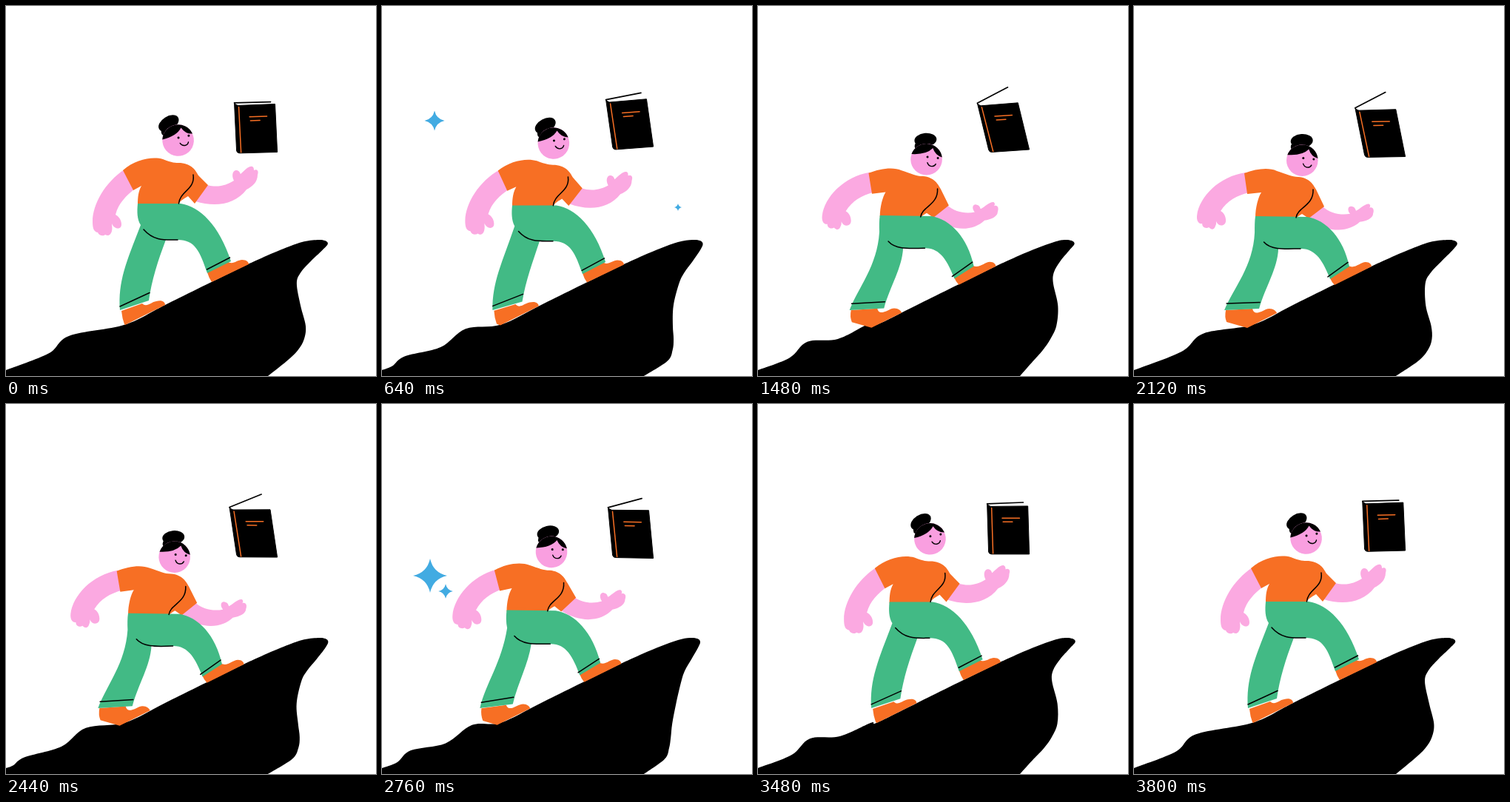
Animation of 500 by 500 pixels, one loop 3840 ms. Source, as an HTML page:

```html
<!DOCTYPE html>
<html lang="en">
<head>
<meta charset="utf-8">
<title>Uphill with a book</title>
<style>
html, body { margin: 0; width: 100%; height: 100%; overflow: hidden; background: #fff; }
svg { display: block; width: 100vw; height: 100vh; }
</style>
</head>
<body>
<svg id="stage" viewBox="0 0 500 500"></svg>
<script>
const LOOP = 3840, TURN = 1940, RIPPLE = 1920;
const PINK = '#fba9e1', FACE = '#f99fe0', ORANGE = '#f76f24', GREEN = '#42ba85', BLUE = '#42abe2';
const stage = document.getElementById('stage');

function add(tag, attrs, parent = stage) {
  const el = document.createElementNS('http://www.w3.org/2000/svg', tag);
  for (const k in attrs) el.setAttribute(k, attrs[k]);
  return parent.appendChild(el);
}
const fill = (color, d = '', parent) => add('path', { fill: color, d }, parent);
const line = (color, width, d = '', parent) =>
  add('path', { fill: 'none', stroke: color, 'stroke-width': width, 'stroke-linecap': 'round', d }, parent);
const lerp = (a, b, k) => a + (b - a) * k;
const wave = (t, peak, period = LOOP) => Math.cos((t - peak) / period * 2 * Math.PI);

// Smooth curve through the given points.
function smooth(p) {
  let d = `M${p[0]}`;
  for (let i = 0; i < p.length - 1; i++) {
    const a = p[Math.max(i - 1, 0)], b = p[i], c = p[i + 1], e = p[Math.min(i + 2, p.length - 1)];
    d += `C${b.map((v, j) => v + (c[j] - a[j]) / 6)} ${c.map((v, j) => v - (e[j] - b[j]) / 6)} ${c}`;
  }
  return d;
}

// Humps are born at the far left, drift up the bank and fade near the shoe.
const BORN = 380, GONE = 3500;
function bank(t) {
  const pts = [[0, 492]];
  for (let age = t % RIPPLE; age < GONE; age += RIPPLE) {
    if (age <= BORN) continue;
    const size = 13 * Math.sqrt(Math.sin(Math.PI * (age - BORN) / (GONE - BORN)));
    const notch = 16 + .034 * (age - 700), crest = 33 + .043 * (age - 700);
    pts.push([notch, 492 - .39 * notch], [crest, 492 - .39 * crest - size]);
  }
  return pts;
}

// The overhang: a sine wave running down its resting outline.
const overhang = [[426, 330], [414, 345], [403.5, 360], [399, 375], [399, 405], [399, 432], [396, 450], [390, 465], [379, 480]];
const ridge = [[161, 430.5], [215, 404], [300, 362], [340, 343], [375, 328], [400, 319]];
const sway = (t, y) => lerp(5.5, 7.5, (y - 321) / 160) * wave(t, 600 + 13.3 * (y - 345), RIPPLE);

const cliff = fill('#000');
function drawCliff(t) {
  const tip = 431.5 + sway(t, 321);
  const nose = [[tip - 14, 316], [tip - 4, 317], [tip, 321.5]];
  const side = overhang.map(([x, y]) => [x + sway(t, y), y]);
  cliff.setAttribute('d', smooth([...bank(t), ...ridge, ...nose, ...side, [354, 500]]) + 'L0,500Z');
}

// Body parts: each is a path in the upright pose and in the crouched pose.
const parts = [];
const part = (el, up, down) => parts.push({ el, up, down: down.match(/[\d.]+/g).map(Number) });

// back shoe
part(fill(ORANGE),
  'M156,412L184,402C190,408 196,400 203,399C211,397 215,400 215,404L161,431L160,430Q157,422 156,412Z',
  'M124,411L160,409C162,419 172,413 178,410C186,407 192,412 193,415L153,435L125,427Q122,420 124,411Z');
// front shoe
part(fill(ORANGE),
  'M272,360L299,345C306,351 312,343 319,343C325,343 328,346 328,349L278,373Q274,367 272,360Z',
  'M265,368L290,351C298,356 306,346 313,346C318,346 321,349 321,352L271,377Q267,373 265,368Z');
// back arm
part(fill(PINK),
  'M160,221C134,238 117,268 117,291C117,299 118,305 124,306C126,311 132,311 134,309C139,312 142,308 143,304C144,300 143,297 143,294C146,302 156,303 156,295C156,289 152,284 148,282C152,266 163,256 174,247Z',
  'M151,225C115,230 88,258 85,283C84,291 88,295 92,294C92,300 98,301 101,299C106,304 109,301 110,297C111,295 111,294 111,291C114,299 124,298 124,290C124,284 121,279 117,277C126,263 139,256 155,252Z');
// front arm
part(fill(PINK),
  'M272,242C287,246 298,242 308,236C304,228 307,221 312,222C316,223 316,226 317,227C322,222 329,215 333,217C335,218 335,221 335,222C339,220 342,223 340,228C340,238 333,244 325,248C309,269 282,272 256,264Z',
  'M254,270C265,281 280,283 292,281C287,275 290,270 294,271C299,272 299,275 300,277C307,273 314,266 318,268C320,270 319,272 318,273C323,271 325,276 323,281C323,287 314,291 305,292C290,306 262,308 236,287Z');
// shirt
part(fill(ORANGE),
  'M158,222C175,207 198,203 212,207C225,212 228,212 236,212C252,214 256,222 260,229L273,242L255,267L246,257C238,262 234,264 233,269L178,269C178,258 179,250 183,243L172,249Z',
  'M149,226C165,220 182,218 193,223C206,227 213,231 222,231C238,232 243,243 246,248L257,271L236,287L227,281C222,284 220,285 219,288L164,286C164,272 168,258 172,252L153,254Z');
// trousers
part(fill(GREEN),
  'M178,267L236,267C262,271 288,296 304,345L272,361C262,332 256,316 232,316L216,316C205,345 197,370 193,398L154,411C151,372 163,345 182,296C177,288 177,278 178,267Z',
  'M164,284L234,285C260,289 283,314 291,352L265,369C256,346 246,328 226,328L195,328C194,355 178,378 169,409L122,411C135,380 161,352 163,306C163,298 163,290 164,284Z');
// seams
const seam = (up, down) => part(line('#000', 1.5), up, down);
seam('M253,228C256,248 235,250 233.5,267', 'M242,248C243,270 221,272 219,286');
seam('M186,302C200,318 215,316 232,316', 'M175.5,319C186,331 208,328 225,328');
seam('M154,406L194,387.5', 'M125,402L170,400.5');
seam('M271.5,356L302.5,340', 'M262,366L289,346.5');

const head = add('g');
const bun = add('g', {}, head);
add('ellipse', { cx: -.5, cy: -26.3, rx: 15, ry: 9.3, transform: 'rotate(-4 0 -26)' }, bun);
add('ellipse', { cx: -5, cy: -18, rx: 10.5, ry: 8 }, bun);
add('circle', { r: 21.3, fill: FACE }, head);
fill('#000', 'M-20,-7.5Q0,-6 9,-15Q12,-5 21.2,-2.5A21.4,21.4 0 0 0 -20,-7.5Z', head);
add('circle', { cx: 1.5, cy: -3.2, r: 1.5 }, head);
add('circle', { cx: 15.5, cy: -1.5, r: 1.5 }, head);
line('#000', 1.4, 'M1.3,4.5C3,10.5 10,11 12.5,6.5', head);

function drawPerson(t) {
  const u = t < TURN ? t / TURN : (LOOP - t) / (LOOP - TURN);
  const e = u < .5 ? 4 * u ** 3 : 1 - 4 * (1 - u) ** 3;
  for (const { el, up, down } of parts) {
    let i = 0;
    el.setAttribute('d', up.replace(/[\d.]+/g, n => lerp(+n, down[i++], e).toFixed(2)));
  }
  head.setAttribute('transform',
    `translate(${lerp(232.6, 227.3, e)} ${lerp(181.5, 208.7, e)}) rotate(${lerp(-18, 0, e)})`);
  bun.setAttribute('transform', `rotate(${lerp(-10, 0, e)})`);
}

const pages = fill('#fff');
const backCover = line('#000', 1.7);
const cover = add('path', { stroke: '#000', 'stroke-width': 1, 'stroke-linejoin': 'round' });
const hinge = line(ORANGE, 1.5);
const title = line(ORANGE, 1.5);

function drawBook(t) {
  const rad = Math.PI / 180;
  const tilt = (-1.8 - 3 * wave(t, 1000)) * rad;
  const lean = (7.7 + 6 * wave(t, 1560)) * rad;
  const open = (1 - wave(t, 0)) / 2;
  const w = [51 * Math.cos(tilt), 51 * Math.sin(tilt)];
  const h = [65 * Math.sin(lean), 65 * Math.cos(lean)];
  const corner = [366.6 - w[0] - h[0], 199 - 9.5 * wave(t, 860) - w[1] - h[1]];
  const at = (a, b, dx = 0, dy = 0) =>
    [corner[0] + a * w[0] + b * h[0] + dx, corner[1] + a * w[1] + b * h[1] + dy];
  const spine = at(0, 0, -4, -3);
  const ang = tilt - 27 * open * rad, len = 49 - 3 * open;
  const edge = [spine[0] + len * Math.cos(ang), spine[1] + len * Math.sin(ang)];
  pages.setAttribute('d', `M${spine}L${edge}L${at(.98, 0)}L${at(0, 0)}Z`);
  backCover.setAttribute('d', `M${spine}L${edge}`);
  cover.setAttribute('d',
    `M${spine}Q${at(0, 0, -2, 0)} ${at(0, 0, 1, .5)}L${at(1, 0)}L${at(1, 1)}L${at(0, 1)}Q${at(0, 1, -3, 0)} ${at(0, 1, -4, -3)}Z`);
  hinge.setAttribute('d', `M${at(0, 0, 2, 2.5)}L${at(0, 1, 2, -1)}`);
  title.setAttribute('d', `M${at(.31, .25)}L${at(.77, .25)}M${at(.33, .33)}L${at(.58, .33)}`);
}

// Sparkles: x, y, largest radius, start, end
const stars = [
  [71, 155, 20, 480, 1160],
  [400, 272, 11, 550, 1150],
  [447, 250, 22, 660, 1220],
  [65, 232, 23, 2440, 3080],
  [86, 253, 11.5, 2560, 3180]
].map(([x, y, r, from, to]) => ({ el: fill(BLUE), x, y, r, from, to }));

function drawStars(t) {
  for (const { el, x, y, r, from, to } of stars) {
    const k = (t - from) / (to - from);
    const s = k > 0 && k < 1 ? r * Math.sin(Math.PI * k) : 0;
    const c = s * .18;
    el.setAttribute('d', s
      ? `M${x},${y - s}Q${x + c},${y - c} ${x + s},${y}Q${x + c},${y + c} ${x},${y + s}Q${x - c},${y + c} ${x - s},${y}Q${x - c},${y - c} ${x},${y - s}Z`
      : '');
  }
}

function draw(t) {
  drawCliff(t);
  drawPerson(t);
  drawBook(t);
  drawStars(t);
}

const start = performance.now();
function tick() {
  draw((performance.now() - start) % LOOP);
  requestAnimationFrame(tick);
}
tick();
</script>
</body>
</html>
```
